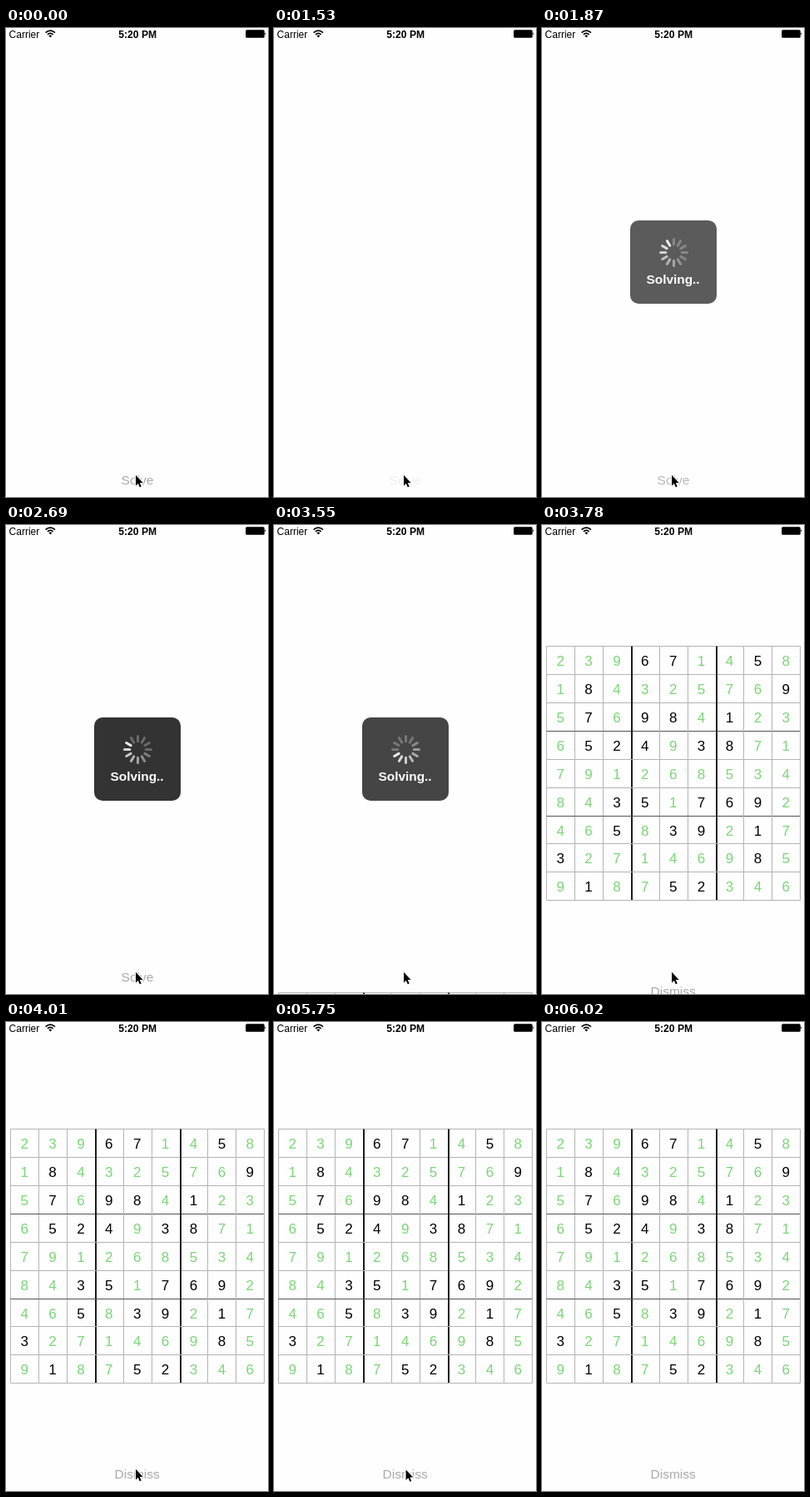
Recreate the animation shown at these times as an HTML page. Size 315 px wide and 563 px high, loop 6.41 s.

```html
<!DOCTYPE html>
<html lang="en">
<head>
<meta charset="utf-8">
<title>Sudoku solver</title>
<style>
  html, body { margin: 0; width: 100%; height: 100%; overflow: hidden; background: #fefefe; }
  svg { display: block; width: 315px; height: 563px; font-family: "Liberation Sans", Arial, sans-serif; }
  .button { font-size: 15.5px; fill: #a9a9a9; text-anchor: middle; }
  .digit { font-size: 17px; text-anchor: middle; }
</style>
</head>
<body>
<svg viewBox="0 0 315 563">
  <rect width="315" height="563" fill="#fefefe"/>
  <text id="solve" class="button" x="158" y="548">Solve</text>

  <g id="modal">
    <rect width="315" height="563" fill="#fefefe"/>
    <g id="grid"></g>
    <text class="button" x="157.7" y="548">Dismiss</text>
  </g>

  <text x="3.6" y="11.5" font-size="12">Carrier</text>
  <g fill="none" stroke="#000" stroke-width="1.7">
    <path d="M47.6 5.6Q53.3 .6 59 5.6M49.9 7.9Q53.3 4.9 56.7 7.9"/>
    <path d="M51.3 9.2Q53.3 7.6 55.3 9.2L53.3 11.4Z" fill="#000" stroke="none"/>
  </g>
  <text x="158.2" y="11.5" font-size="12.1" font-weight="bold" text-anchor="middle">5:20 PM</text>
  <rect x="288.2" y="2.3" width="22.5" height="9.4" rx="1.5"/>
  <path d="M311.3 5.3Q313.3 7 311.3 8.7Z"/>

  <g id="hud">
    <rect x="106" y="231" width="104" height="100" rx="10" fill="#333"/>
    <g id="spinner" transform="translate(158.5 269.5)" stroke="#fff" stroke-width="3" stroke-linecap="round"></g>
    <text x="157.6" y="307" font-size="15.4" font-weight="bold" fill="#fff" text-anchor="middle">Solving..</text>
  </g>

  <path id="cursor" d="M0 0V12.6L2.8 9.9L4.8 14.4L6.7 13.6L4.8 9.2H8.7Z"
        stroke="#fff" stroke-width="2.2" paint-order="stroke" stroke-linejoin="round"/>
</svg>
<script>
const LOOP = 6410, SPOKES = 12, CELL = 305 / 9, LEFT = 5.5, TOP = 128.5;
const $ = id => document.getElementById(id);
const add = (parent, tag, attrs, text = '') => {
  const el = document.createElementNS('http://www.w3.org/2000/svg', tag);
  for (const key in attrs) el.setAttribute(key, attrs[key]);
  el.textContent = text;
  return parent.appendChild(el);
};
const move = (id, x, y) => $(id).setAttribute('transform', `translate(${x} ${y})`);
const smooth = (t, start, length) => {
  const p = Math.min(1, Math.max(0, (t - start) / length));
  return p * p * (3 - 2 * p);
};

const solution = [
  '239671458', '184325769', '576984123',
  '652493871', '791268534', '843517692',
  '465839217', '327146985', '918752346'
];
// 'x' marks a digit given at the start
const givens = [
  '...xx..x.', '.x......x', '.x.xx.x..',
  '.xxx.xx..', '.........', '..xx.xxx.',
  '..x.xx.x.', 'x......x.', '.x..xx...'
];

const grid = $('grid');
for (let i = 0; i <= 9; i++) {
  const thick = i === 3 || i === 6;
  const at = Math.round(i * CELL + .2);
  add(grid, 'path', { d: `M${LEFT} ${TOP + at}h305`, stroke: thick ? '#555' : '#b4b4b4' });
  add(grid, 'path', {
    d: `M${LEFT + at + (thick ? .5 : 0)} ${TOP}v305`,
    stroke: thick ? '#1c1c1c' : '#b4b4b4', 'stroke-width': thick ? 2 : 1
  });
}
solution.forEach((row, r) => [...row].forEach((digit, c) => add(grid, 'text', {
  class: 'digit',
  x: LEFT + (c + .5) * CELL - .3,
  y: TOP + (r + .5) * CELL + 6.8,
  fill: givens[r][c] === 'x' ? '#000' : '#7bd676'
}, digit)));

const spokes = Array.from({ length: SPOKES }, (_, i) =>
  add($('spinner'), 'path', { d: 'M0-9.7V-16', transform: `rotate(${i * 30})` }));

function draw(t) {
  const appear = t < 1790 ? 0 : smooth(t, 1764, 150);
  const pressed = t >= 1530;
  $('solve').setAttribute('opacity', pressed ? .2 + .8 * appear : 1);
  $('hud').setAttribute('opacity', appear * (1 - smooth(t, 3523, 150)));

  const head = Math.floor((t - 2690) / 81) + 10;
  spokes.forEach((spoke, i) => {
    const age = (((head - i) % SPOKES) + SPOKES) % SPOKES;
    spoke.setAttribute('opacity', Math.max(.27, .9 - age * .09));
  });

  // critically damped spring
  const x = Math.max(0, t - 3504) * .0193;
  move('modal', 0, Math.round(563 * (1 + x) * Math.exp(-x)));

  const p = Math.max(0, (t - 5730) / 290);
  const leave = t < 5750 ? 0 : p ** 1.5;
  move('cursor', 156 + 132 * leave, 536.8 + 30 * leave);
}

function tick() {
  draw(performance.now() % LOOP);
  requestAnimationFrame(tick);
}
tick();
</script>
</body>
</html>
```
